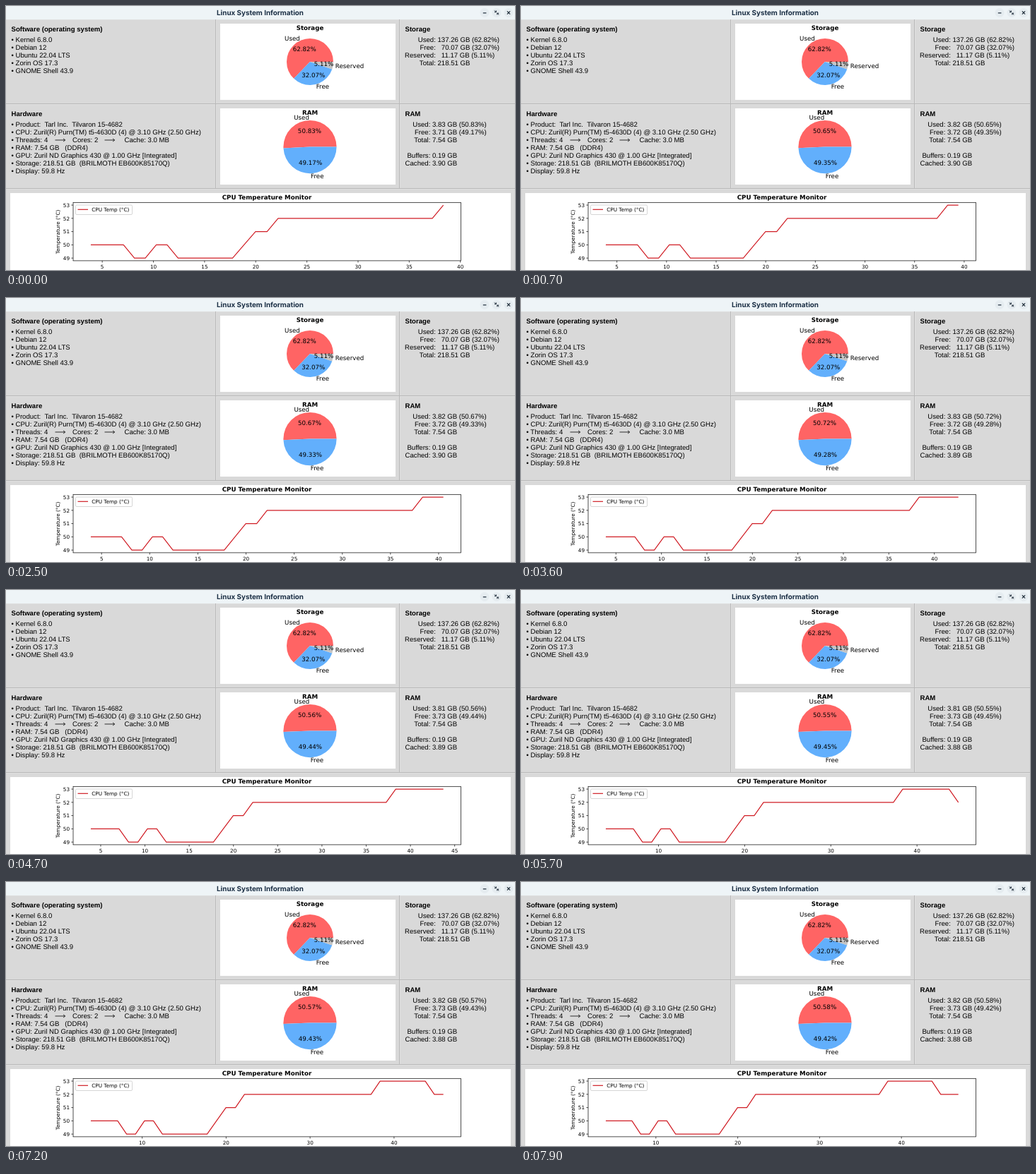
An HTML page with a canvas for the animation above (8000 ms loop, 720 by 374 pixels).

```html
<!DOCTYPE html>
<html lang="en">
<head>
<meta charset="utf-8">
<title>Linux System Information</title>
<style>
html, body { margin: 0; width: 100%; height: 100%; overflow: hidden; background: #d9d9d9; }
canvas { display: block; width: 720px; height: 374px; }
</style>
</head>
<body>
<canvas id="stage"></canvas>
<script>
const W = 720, H = 374, LOOP = 8000;
const canvas = document.getElementById('stage');
const ctx = canvas.getContext('2d');
const dpr = window.devicePixelRatio || 1;
canvas.width = W * dpr;
canvas.height = H * dpr;
ctx.textRendering = 'geometricPrecision';

const SANS = '9.6px "Liberation Sans", Arial, sans-serif';
const ROW = 10.98;
const plotFont = (size, weight = '') => `${weight} ${size}px "DejaVu Sans", sans-serif`;
const RED = '#ff6464', BLUE = '#62affc', GREY = '#c4c4c4', LINE = '#d01c24';

// Refresh times and the readings each refresh brings
const UPDATES = [0, 300, 1400, 2600, 3600, 4600, 5600, 6700, 7700];
const RAM_USED = [50.83, 50.65, 50.67, 50.69, 50.72, 50.56, 50.55, 50.57, 50.58];
const CACHED = [3.90, 3.90, 3.90, 3.90, 3.89, 3.89, 3.88, 3.88, 3.88];
const RAM_TOTAL = 7.544;

// Temperature runs: [value, number of samples]
const RUNS = [[50, 4], [49, 2], [50, 2], [49, 6], [50, 1], [51, 2], [52, 15], [53, 6], [52, 3]];
const TEMPS = RUNS.flatMap(([value, count]) => Array(count).fill(value));
const FIRST_COUNT = 33;

// Sampling slows down a little from sample 13 to 16
function sampleTime(n) {
  const slow = Math.min(1, Math.max(0, (n - 13) / 3));
  return 3.88 + n * (1.066 + 0.0108 * slow);
}

function text(str, x, y, font, align = 'left', color = '#000') {
  ctx.font = font;
  ctx.textAlign = align;
  ctx.fillStyle = color;
  ctx.fillText(str, x, y);
}

function rect(x, y, w, h, color) {
  ctx.fillStyle = color;
  ctx.fillRect(x, y, w, h);
}

function path(points, color, width) {
  ctx.beginPath();
  points.forEach(([x, y]) => ctx.lineTo(x, y));
  ctx.strokeStyle = color;
  ctx.lineWidth = width;
  ctx.stroke();
}

function titleBar() {
  rect(0, 0, W, 19, '#eef4f7');
  text('Linux System Information', 359.5, 13.2, '700 9.85px Inter, sans-serif', 'center', '#1b2f45');
  const ink = '#1c2a38';
  for (const x of [677, 694, 711]) {
    ctx.beginPath();
    ctx.arc(x, 9.5, 6.5, 0, 7);
    ctx.fillStyle = '#e5ecf0';
    ctx.fill();
  }
  path([[674.8, 9.9], [679.4, 9.9]], ink, 1.2);
  path([[691, 8.7], [693.3, 8.7], [693.3, 6.4]], ink, 1);
  path([[694.8, 12.4], [694.8, 10.2], [697.2, 10.2]], ink, 1);
  path([[691, 6.4], [693.3, 8.7]], ink, 1);
  path([[694.8, 10.2], [697.2, 12.4]], ink, 1);
  path([[708.9, 7.4], [713.1, 11.6]], ink, 1.2);
  path([[713.1, 7.4], [708.9, 11.6]], ink, 1.2);
}

function panel(x, y, w, h) {
  rect(x, y, w, h, '#b9b9b9');
  rect(x + 1, y + 1, w - 1, h - 1, '#dfdfdf');
  rect(x + 2, y + 2, w - 2, h - 2, '#d9d9d9');
}

function heading(str, x, y) {
  text(str, x, y, 'bold ' + SANS);
}

function lines(rows, x, y) {
  rows.forEach((row, i) => text(row, x, y + i * ROW, SANS));
}

// Label/value rows meeting at a colon
function table(rows, x, y) {
  rows.forEach(([label, value], i) => {
    text(label, x, y + i * ROW, SANS, 'right');
    text(value, x + 2.67, y + i * ROW, SANS);
  });
}

function arrow(x, y) {
  path([[x, y], [x + 14, y]], '#000', 0.8);
  path([[x + 11.6, y - 2], [x + 14.2, y], [x + 11.6, y + 2]], '#000', 0.8);
}

function pie(cx, cy, r, parts) {
  const font = plotFont(8.7);
  const labels = [];
  let from = 0;
  for (const [name, pct, color] of parts) {
    const to = from + pct / 50 * Math.PI;
    ctx.beginPath();
    ctx.moveTo(cx, cy);
    ctx.arc(cx, cy, r, -from, -to, true);
    ctx.fillStyle = color;
    ctx.fill();
    labels.push([name, pct, (from + to) / 2]);
    from = to;
  }
  for (const [name, pct, mid] of labels) {
    const dx = r * Math.cos(mid), dy = -r * Math.sin(mid);
    text(name, cx + 1.1 * dx, cy + 1.1 * dy + 2.9, font, dx > 0 ? 'left' : 'right');
    text(pct.toFixed(2) + '%', cx + 0.6 * dx, cy + 0.6 * dy + 2.9, font, 'center');
  }
}

function chart(count) {
  const left = 95, right = 643.6, top = 278.3, bottom = 360.9;
  const t0 = sampleTime(0), span = sampleTime(count - 1) - t0;
  const scale = (right - left) / (span * 1.1);
  const px = t => left + (t - t0 + span * 0.05) * scale;
  const py = v => 282.05 + (53 - v) * 18.77;
  const tickFont = plotFont(7.25);

  text('CPU Temperature Monitor', 369, 274, plotFont(8.7, 'bold'), 'center');
  ctx.lineJoin = 'round';
  path(TEMPS.slice(0, count).map((v, n) => [px(sampleTime(n)), py(v)]), LINE, 1.2);
  ctx.lineJoin = 'miter';

  const step = span * 1.1 > 44.5 ? 10 : 5;
  for (let t = step; px(t) <= right; t += step) {
    path([[px(t), bottom], [px(t), bottom + 2.6]], '#000', 0.7);
    text(t, px(t), 372.1, tickFont, 'center');
  }
  for (let v = 49; v <= 53; v++) {
    path([[left - 2.6, py(v)], [left, py(v)]], '#000', 0.7);
    text(v, 90, py(v) + 2.8, tickFont, 'right');
  }
  ctx.strokeStyle = '#000';
  ctx.lineWidth = 0.7;
  ctx.strokeRect(left, top, right - left, bottom - top);

  ctx.save();
  ctx.translate(75.5, 320);
  ctx.rotate(-Math.PI / 2);
  text('Temperature (°C)', 0, 0, tickFont, 'center');
  ctx.restore();

  ctx.beginPath();
  ctx.roundRect(98.5, 282, 80, 13.5, 1.5);
  ctx.fillStyle = '#fff';
  ctx.fill();
  ctx.strokeStyle = '#ccc';
  ctx.lineWidth = 0.8;
  ctx.stroke();
  path([[101.5, 288.3], [116, 288.3]], LINE, 1.2);
  text('CPU Temp (°C)', 121.3, 291, tickFont);
}

function software() {
  panel(-2, 18, 298, 120);
  heading('Software (operating system)', 7.5, 35.8);
  lines(['• Kernel 6.8.0', '• Debian 12', '• Ubuntu 22.04 LTS', '• Zorin OS 17.3',
    '• GNOME Shell 43.9'], 7.5, 51.3);
}

function hardware() {
  const top = 171.2, arrowY = top + 2 * ROW - 3.2;
  panel(-2, 138, 298, 120);
  heading('Hardware', 7.5, 155.6);
  lines(['• Product:  Tarl Inc.  Tilvaron 15-4682',
    '• CPU: Zuril(R) Purn(TM) t5-4630D (4) @ 3.10 GHz (2.50 GHz)',
    '• Threads: 4',
    '• RAM: 7.54 GB   (DDR4)',
    '• GPU: Zuril ND Graphics 430 @ 1.00 GHz [Integrated]',
    '• Storage: 218.51 GB  (BRILMOTH EB600K85170Q)',
    '• Display: 59.8 Hz'], 7.5, top);
  text('Cores: 2', 94, top + 2 * ROW, SANS);
  text('Cache: 3.0 MB', 167.5, top + 2 * ROW, SANS);
  arrow(69.5, arrowY);
  arrow(139.5, arrowY);
}

function storage() {
  panel(296, 18, 260, 120);
  rect(303, 25, 248, 108, '#fff');
  text('Storage', 430, 33.7, plotFont(8.7, 'bold'), 'center');
  pie(430, 79, 33, [['Used', 62.82, RED], ['Free', 32.07, BLUE], ['Reserved', 5.11, GREY]]);
  panel(556, 18, 166, 120);
  heading('Storage', 564.5, 35.8);
  table([['Used:', '137.26 GB (62.82%)'], ['Free:', '  70.07 GB (32.07%)'],
    ['Reserved:', '  11.17 GB (5.11%)'], ['Total:', '218.51 GB']], 607.8, 51.3);
}

function memory(used, cached) {
  const free = 100 - used;
  const share = pct => `${(RAM_TOTAL * pct / 100).toFixed(2)} GB (${pct.toFixed(2)}%)`;
  panel(296, 138, 260, 120);
  rect(303, 145, 248, 108, '#fff');
  text('RAM', 430, 153.6, plotFont(8.7, 'bold'), 'center');
  pie(430, 199.6, 37.6, [['Used', used, RED], ['Free', free, BLUE]]);
  panel(556, 138, 166, 120);
  heading('RAM', 564.5, 155.6);
  table([['Used:', share(used)], ['Free:', share(free)], ['Total:', '7.54 GB'], ['', ''],
    ['Buffers:', '0.19 GB'], ['Cached:', cached.toFixed(2) + ' GB']], 600.3, 171.2);
}

function draw(time) {
  const tick = UPDATES.filter(t => t <= time).length - 1;
  ctx.setTransform(dpr, 0, 0, dpr, 0, 0);
  software();
  storage();
  hardware();
  memory(RAM_USED[tick], CACHED[tick]);
  titleBar();
  panel(-2, 258, W + 4, 122);
  rect(6, 265, 708, 109, '#fff');
  chart(FIRST_COUNT + tick);
}

const start = performance.now();
function loop() {
  draw((performance.now() - start) % LOOP);
  requestAnimationFrame(loop);
}
loop();
</script>
</body>
</html>
```
